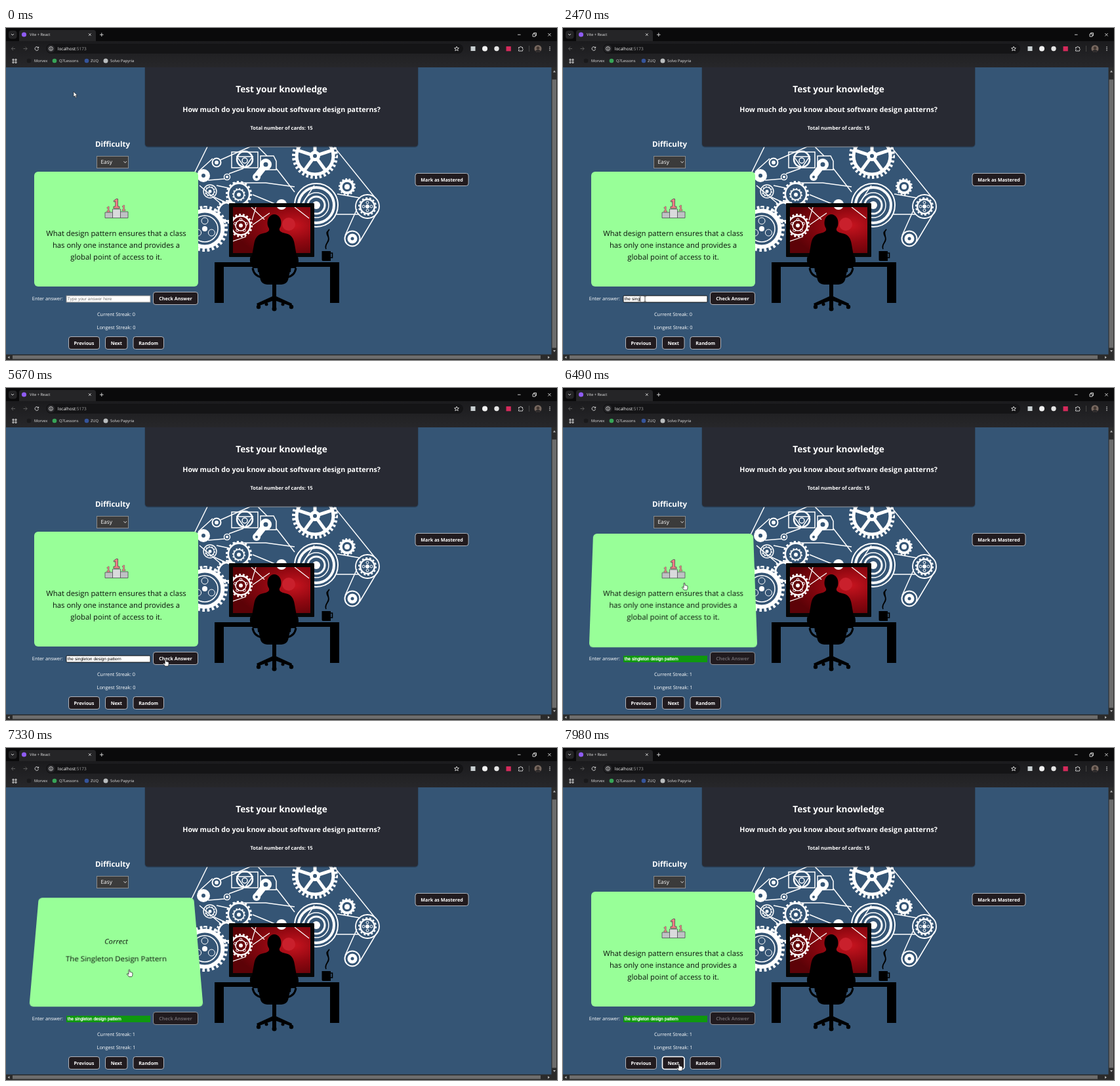
Animation, 840 px wide and 506 px high, one loop 8000 ms. Source, as an HTML page:

```html
<!DOCTYPE html>
<html lang="en">
<head>
<meta charset="utf-8">
<title>Flashcards</title>
<style>
html, body { margin: 0; width: 100%; height: 100%; overflow: hidden; background: #355575; }
svg { position: absolute; left: 0; top: 0; display: block; }
text {
  font-family: "Open Sans", "Noto Sans", sans-serif;
  fill: #fff;
  text-rendering: geometricPrecision;
}
.mid { text-anchor: middle; }
.bold { font-weight: 700; }
.ui { font-size: 5.8px; fill: #e3e3e3; }
.field { font: 6.67px "Liberation Sans", Arial, sans-serif; }
.line { fill: none; stroke: #e0e0e0; }
.face {
  left: 43px; top: 219px;
  background: #98ff98; border-radius: 6px;
  backface-visibility: hidden;
  animation: front 8s infinite;
}
.face text { fill: #0b120b; font-size: 11.3px; text-anchor: middle; }
.back { animation-name: back; }
@keyframes front {
  0%, 80.825% { transform: perspective(500px) rotateX(0deg); animation-timing-function: ease; }
  85.825%, 91.1% { transform: perspective(500px) rotateX(180deg); animation-timing-function: ease; }
  96.1%, 100% { transform: perspective(500px) rotateX(0deg); }
}
@keyframes back {
  0%, 80.825% { transform: perspective(500px) rotateX(180deg); animation-timing-function: ease; }
  85.825%, 91.1% { transform: perspective(500px) rotateX(0deg); animation-timing-function: ease; }
  96.1%, 100% { transform: perspective(500px) rotateX(180deg); }
}
</style>
</head>
<body>
<svg width="840" height="506" viewBox="0 0 840 506">
  <defs>
    <radialGradient id="glow" cx=".78" cy=".4" r=".75">
      <stop offset="0" stop-color="#c8141f"/>
      <stop offset=".5" stop-color="#8e0710"/>
      <stop offset="1" stop-color="#5c0207"/>
    </radialGradient>
    <linearGradient id="bar" x2="0" y2="1">
      <stop offset="0" stop-color="#151517"/>
      <stop offset="1" stop-color="#27272a"/>
    </linearGradient>
    <clipPath id="screenClip"><rect x="346" y="273" width="118" height="70"/></clipPath>
    <clipPath id="faceClip"><circle cx="811" cy="31.500" r="5.500"/></clipPath>
  </defs>
  <rect width="840" height="506" fill="#355575"/>

  <!-- machinery -->
  <g id="works" fill="none" stroke="#fff"></g>

  <!-- monitor -->
  <rect x="340" y="267" width="130" height="82" rx="1" fill="#060606"/>
  <rect x="346" y="273" width="118" height="70" fill="url(#glow)"/>
  <g id="inner" clip-path="url(#screenClip)" fill="none" stroke="#fff"></g>
  <circle cx="431" cy="299" r="10" fill="#c9202c"/>

  <!-- desk, cup, person -->
  <path d="M318 357H508V419H494V364H332V419H318Z"/>
  <path d="M481.500 340H495V355H483Q481.500 355 481.500 353Z"/>
  <path d="M495 343h2.500v7h-2.500M488 337c-4-8 7-11 3-19s-1-7 2-11c-5 5-1 9-1 15s-7 7-4 15" fill="none" stroke="#000" stroke-width="1.600"/>
  <ellipse cx="409" cy="297" rx="10.500" ry="13"/>
  <path d="M401 305Q403 311 392 313Q380 315 378 330L375 347Q371 348 372 356L376 366H384L388 384Q390 390 398 391H420Q428 390 430 384L434 366H442L446 356Q446 348 443 347L440 330Q438 315 426 313Q415 311 417 305Z"/>
  <path d="M380 329Q379 317 391 316H427Q439 317 438 329L434 372H384Z"/>
  <path d="M406 390h6v19l24 11-1 4-23-8v10h-6v-10l-22 8-2-4 24-11z"/>
  <g><circle cx="385" cy="425" r="3.200"/><circle cx="435" cy="425" r="3.200"/><circle cx="397" cy="421" r="2.500"/><circle cx="422" cy="421" r="2.500"/><circle cx="409" cy="428" r="3.500"/></g>
  <path d="M376 366q2 12 14 14M442 366q-2 12-14 14" fill="none" stroke="#000" stroke-width="3"/>

  <!-- heading -->
  <rect x="211.500" y="56" width="417" height="126" rx="5" fill="#1d2b3b" opacity=".5"/>
  <rect x="212" y="56" width="416" height="124.500" rx="4.500" fill="#282a33"/>
  <g class="mid bold">
    <text x="420" y="98.300" font-size="13.600">Test your knowledge</text>
    <text x="420" y="128.300" font-size="10.650">How much do you know about software design patterns?</text>
    <text x="420" y="154.800" font-size="7.550">Total number of cards: 15</text>
    <text x="162.500" y="181.300" font-size="11.500" fill="#eef3f7">Difficulty</text>
  </g>
  <rect x="138.500" y="195.500" width="48" height="18" fill="#3b3b3b" stroke="#8b8b8b"/>
  <text x="144.500" y="207.400" font-size="8.300">Easy</text>
  <path class="line" d="M179.500 203.200l2.200 2.300 2.200-2.300"/>

  <!-- answer row -->
  <text x="39.800" y="415" font-size="7.350">Enter answer:</text>
  <rect id="box" x="92" y="408" width="128" height="10"/>
  <text id="typed" class="field" x="93.800" y="415.300"></text>
  <rect id="caret" y="409" width=".7" height="8" fill="#000"/>
  <g class="mid" font-size="7.400">
    <text id="now" x="168" y="438.700"></text>
    <text id="best" x="168" y="458.700"></text>
  </g>
  <g id="buttons" class="mid bold" font-size="7.200"></g>

  <!-- scrollbars -->
  <path d="M831.500 60H840V506H0V497.500H831.500Z" fill="#2b2b2b"/>
  <path d="M832.500 78.500h6.500v409h-6.500zM10 499h805v5.500H10z" fill="#6d6d6d"/>
  <path d="M834 67.500h4l-2-3zM834 491h4l-2 3zM5.500 500v4l-3-2zM826 500v4l3-2z" fill="#b5b5b5"/>

  <!-- browser frame -->
  <rect width="840" height="60" fill="url(#bar)"/>
  <rect width="840" height="20" fill="#0a0a0b"/>
  <rect x="4" y="4" width="12.500" height="12.500" rx="4" fill="#242426"/>
  <path d="M20 20V7q0-4 4-4H133q4 0 4 4V20Z" fill="#252527"/>
  <circle cx="27.500" cy="10" r="3.600" fill="#8f5cf2"/>
  <text class="ui" x="36" y="12.200" font-size="5.900">Vite + React</text>
  <rect x="61" y="24" width="636" height="15" rx="7.500" fill="#141416"/>
  <circle cx="68.500" cy="31.500" r="5.800" fill="#29292c"/>
  <text x="78.800" y="33.900" font-size="6.500">localhost<tspan fill="#a2a2a2">:5173</tspan></text>
  <g class="line" stroke-width=".9">
    <path d="M8 9l2 2 2-2M126 8.300l3.600 3.600m0-3.600l-3.600 3.600M143 10.200h5.600m-2.800-2.800v5.600M780 10.200h4.500M803 9h4v4h-4zM804.500 9v-1.500h4v4h-1.500M826.300 8l4.400 4.400m0-4.400l-4.400 4.400"/>
    <path d="M14 31.500H8.500m2.500-2.700-2.700 2.700 2.700 2.700M26.500 31.500H32m-2.500-2.700 2.700 2.700-2.700 2.700" stroke="#656565"/>
    <path d="M49.300 30a2.800 2.800 0 1 0 .3 2.200M49.700 28.500v2h-2"/>
    <circle cx="68.500" cy="31.500" r="2.900"/><path d="M68.500 31v2.200M68.500 29.600v.7"/>
    <path d="M687 28.200l1 2.200 2.400.2-1.800 1.600.6 2.400-2.200-1.300-2.200 1.300.6-2.400-1.800-1.600 2.400-.2z"/>
    <path d="M781.500 29.500h2a1.200 1.200 0 0 1 2.400 0h1.600v2a1.200 1.200 0 0 1 0 2.200v1.300h-6v-1.700a1.200 1.200 0 0 0 0-2.200z"/>
    <path d="M10 47.500h2v2h-2zM14 47.500h2v2h-2zM10 51.300h2v2h-2zM14 51.300h2v2h-2z"/>
  </g>
  <rect x="708.500" y="28" width="7" height="7" fill="#c9d0d2"/>
  <circle cx="730" cy="31.500" r="4" fill="#f2f2f2"/>
  <circle cx="748" cy="31.500" r="3.700" fill="#e4e4e4"/>
  <rect x="762.500" y="28" width="7.300" height="7.300" fill="#d52a5b"/>
  <path d="M797.500 27v9" stroke="#444"/>
  <g clip-path="url(#faceClip)"><path d="M805 25h12v13h-12z" fill="#77685f"/><circle cx="811" cy="30.500" r="2.300" fill="#40352f"/><ellipse cx="811" cy="37" rx="4.500" ry="4" fill="#2d2a2b"/></g>
  <g fill="#ddd"><circle cx="829" cy="29" r=".8"/><circle cx="829" cy="31.500" r=".8"/><circle cx="829" cy="34" r=".8"/></g>
  <circle cx="35" cy="50" r="3.300" fill="#19191b"/>
  <circle cx="74" cy="50" r="3.300" fill="#37a457"/>
  <circle cx="123" cy="50" r="3.300" fill="#35549b"/>
  <circle cx="152" cy="50" r="3.500" fill="#b9bcbe"/>
  <text class="ui" x="43" y="52.100">Morvex</text>
  <text class="ui" x="81" y="52.100">Q7Lessons</text>
  <text class="ui" x="129" y="52.100">ZUQ</text>
  <text class="ui" x="159" y="52.100">Solvo Papyria</text>
</svg>

<svg class="face back" width="250" height="175">
  <text x="125" y="78.500" font-style="italic">Correct</text>
  <text x="125" y="106.500">The Singleton Design Pattern</text>
</svg>
<svg class="face" width="250" height="175">
  <g stroke="#4a4a50" stroke-width=".8" stroke-linejoin="round">
    <path d="M108 62h12v8.500h-12zM131 61h12v9.500h-12z" fill="#bfc1c4"/>
    <path d="M119.500 57h12v13.500h-12z" fill="#d9dadc"/>
    <g fill="#f37f86">
      <path id="one" d="M121 44.500l4-3h2.500v11.500h2.500v3h-9v-3h2.800v-8l-2 1.200z"/>
      <use href="#one" transform="translate(46.600 29) scale(.53 .58)"/>
      <use href="#one" transform="translate(70 27) scale(.53 .58)"/>
    </g>
  </g>
  <text x="125" y="98">What design pattern ensures that a class</text>
  <text x="125" y="116">has only one instance and provides a</text>
  <text x="125" y="134">global point of access to it.</text>
</svg>

<svg width="840" height="506">
  <g id="cursor" stroke-linejoin="round">
    <path id="arrow" d="M0 0v8l1.900-1.700 1.300 2.900 1.400-.6-1.300-2.800h2.500z" fill="#fff" stroke="#111" stroke-width=".6"/>
    <path id="hand" d="M-.9.600q.9-1 1.800 0v3.200q1-.5 1.500.3 1-.4 1.500.4 1.100-.2 1.100.9v2.300q0 2-1.200 3.200H-.5q-1-1.700-2.800-3.500-.5-1.400 1-1.100l1.400 1.100z" fill="#fff" stroke="#111" stroke-width=".7"/>
    <path id="beam" d="M-1.800-4h1.300l.5.500.5-.5h1.300M0-3.500v7M-1.800 4h1.300l.5-.5.5.5h1.300" fill="none" stroke="#222" stroke-width=".8"/>
  </g>
</svg>

<script>
const LOOP = 8000, FOCUS = 740, CHECK = 5830, NEXT = 7970;
const $ = id => document.getElementById(id);

const ring = (x, y, r, w = 1.5) => `<circle cx="${x}" cy="${y}" r="${r}" stroke-width="${w}"/>`;
const disc = (x, y, r, fill = '#fff') => `<circle cx="${x}" cy="${y}" r="${r}" fill="${fill}" stroke="none"/>`;
const belt = (d, w = 1.5) => `<path d="${d}" stroke-width="${w}"/>`;
const gear = (x, y, r, n, w = r * .16) =>
  `<circle cx="${x}" cy="${y}" r="${r * .93}" stroke-width="${r * .14}" pathLength="${2 * n}" stroke-dasharray="1"/>`
  + ring(x, y, r * .87 - w / 2, w);
const around = (n, f) => Array.from({ length: n }, (_, i) => f(i * 2 * Math.PI / n - Math.PI / 2)).join('');
const holes = (x, y, d, r, n) => around(n, a => ring(x + d * Math.cos(a), y + d * Math.sin(a), r, 1));
const spokes = (x, y, r, n, w) => around(n, a => belt(`M${x} ${y}l${r * Math.cos(a)} ${r * Math.sin(a)}`, w));

$('works').innerHTML =
  belt('M274 248L307 181M293 219L315 199M327 201L372 181H440M308 232L333 230M340 222L362 214M346 236H396L440 242')
  + belt('M412 214L440 250M384 181L398 195M500 181L563 259M505 253L540 259M504 284L537 284M567 279L539 326M535 276L517 316')
  + belt('M295 240L330 270M318 258L340 268M321 240L340 244M376 254L410 268M440 285L470 240')
  + gear(471, 195, 35, 30, 5) + spokes(471, 195, 26, 5, 5) + disc(471, 195, 8) + disc(471, 195, 3, '#355575')
  + belt('M344 189H384V213H344ZM352 196H376L364 213Z') + ring(364, 200, 12, 2.5) + ring(364, 202, 4)
  + belt('M388 195H408L412 203V216H388Z') + belt('M396 208L382 226', 10)
  + disc(396, 208, 9) + disc(382, 227, 6) + disc(396, 208, 3.5, '#355575') + disc(382, 227, 2, '#355575')
  + ring(321, 205, 6.5, 2) + disc(321, 205, 3) + disc(301, 225, 10) + disc(301, 225, 3, '#355575')
  + ring(337, 227, 4.5) + disc(337, 227, 2)
  + ring(311, 249, 10) + gear(311, 249, 8, 10) + disc(311, 249, 2.5)
  + gear(355, 253, 20, 18, 2.5) + gear(355, 254, 10, 12) + disc(355, 254, 3)
  + gear(338, 280, 18, 18, 3)
  + gear(303, 306, 35, 28, 6) + ring(303, 306, 20) + holes(303, 306, 12, 5, 3) + disc(303, 306, 4)
  + ring(473, 270, 33, 2) + ring(473, 270, 27, 4) + ring(473, 270, 19, 1.5) + ring(473, 270, 13, 3) + disc(473, 270, 6)
  + gear(520, 242, 13, 14, 4) + disc(520, 242, 4) + disc(420, 269, 8)
  + ring(551, 272, 18, 1.8) + gear(551, 272, 14, 14, 2.5) + holes(551, 272, 6, 2, 4) + disc(551, 272, 3)
  + ring(528, 321, 11.5, 2) + disc(528, 321, 7.5) + disc(528, 321, 2.5, '#355575');

$('inner').innerHTML =
  gear(358, 301, 18, 18, 2.5) + ring(358, 301, 8) + holes(358, 301, 9, 2, 5) + disc(358, 301, 3)
  + disc(420, 269, 8) + belt('M374 273L394 292M376 300L402 282M440 273L462 290M346 325L366 318M381 273L375 293', 1.2);

const button = (id, x, y, w, label) =>
  `<g id="${id}"><rect x="${x + .5}" y="${y + .5}" width="${w - 1}" height="19" rx="3.500" fill="#211b1f" stroke="#d3d4d8" stroke-width=".8"/>`
  + `<text x="${x + w / 2}" y="${y + 12.700}">${label}</text></g>`;
$('buttons').innerHTML =
  button('mark', 623.5, 221, 82, 'Mark as Mastered') + button('check', 224, 402, 69, 'Check Answer')
  + button('prev', 95, 470, 48, 'Previous') + button('next', 151, 470, 34.5, 'Next')
  + button('random', 193.5, 470, 47.5, 'Random');

const answer = 'the singleton design pattern';
const keys = [1380, 1530, 1650, 1890, 2070, 2220, 2330, 2470, 2560, 2620, 2760, 2870, 2980, 3090,
  3200, 3310, 3420, 3530, 3710, 3800, 3890, 4110, 4180, 4360, 4440, 4520, 4600, 4890];

// time, x, y of the pointer
const path = [[20, 103, 97], [660, 125, 413], [5440, 125, 413], [5740, 262, 413], [5880, 262, 413],
  [6220, 185, 297], [7040, 185, 297], [7160, 188, 334], [7310, 188, 334], [7490, 185, 442], [7800, 177, 481]];

function pointer(t) {
  const i = path.findIndex(p => p[0] > t);
  if (i === 0) return path[0].slice(1);
  if (i < 0) return path[path.length - 1].slice(1);
  const [a, b] = [path[i - 1], path[i]];
  const u = (t - a[0]) / (b[0] - a[0]), k = u * u * (3 - 2 * u);
  return [a[1] + (b[1] - a[1]) * k, a[2] + (b[2] - a[2]) * k];
}

const inside = (x, y, l, t, r, b) => x > l && x < r && y > t && y < b;
function kind(x, y, t) {
  if (inside(x, y, 91, 407, 221, 419)) return 'beam';
  if (inside(x, y, 43, 219, 293, 394) || inside(x, y, 151, 470, 186, 490)) return 'hand';
  return t < CHECK && inside(x, y, 224, 402, 293, 422) ? 'hand' : 'arrow';
}

const set = (id, attrs) => { for (const k in attrs) $(id).setAttribute(k, attrs[k]); };
const show = (id, on) => $(id).style.display = on ? '' : 'none';

function drawField(t) {
  const done = t >= CHECK, focus = t >= FOCUS && !done;
  const n = keys.filter(k => k <= t).length;
  const typed = $('typed');
  typed.textContent = n ? answer.slice(0, n) : 'Type your answer here';
  typed.style.fill = done ? '#fff' : n ? '#000' : '#757575';
  typed.style.stroke = done ? '#fff' : 'none';
  typed.style.strokeWidth = '.25px';
  set('box', {
    fill: done ? '#0f980f' : '#fff',
    stroke: done ? 'none' : focus ? '#101010' : '#858585',
    'stroke-width': 1, rx: focus ? 1.5 : 0
  });
  const last = n ? keys[n - 1] : FOCUS;
  show('caret', focus && (t - last) % 1000 < 500);
  set('caret', { x: 93.8 + (n ? typed.getComputedTextLength() : 0) });
}

function draw(t) {
  const done = t >= CHECK;
  drawField(t);
  $('now').textContent = 'Current Streak: ' + +done;
  $('best').textContent = 'Longest Streak: ' + +done;
  const [box, label] = $('check').children;
  box.style.stroke = done ? '#a5a6aa' : '';
  label.style.fill = done ? '#69656a' : '';
  const next = $('next').firstChild.style;
  next.stroke = t >= NEXT ? '#fff' : '';
  next.strokeWidth = t >= NEXT ? '1.600px' : '';
  const [x, y] = pointer(t), shape = kind(x, y, t);
  set('cursor', { transform: `translate(${x} ${y})` });
  for (const id of ['arrow', 'hand', 'beam']) show(id, id === shape);
}

let start;
function tick(now) {
  start ??= now;
  draw((now - start) % LOOP);
  requestAnimationFrame(tick);
}
draw(0);
requestAnimationFrame(tick);
</script>
</body>
</html>
```
